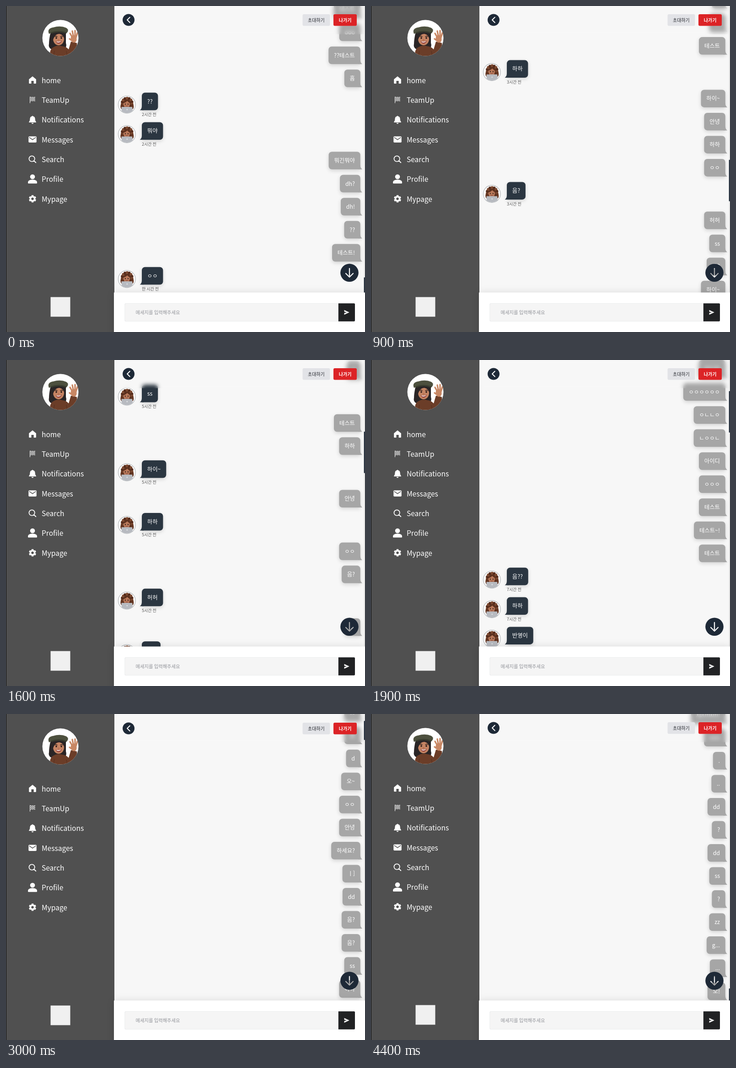
Recreate the animation shown at these times as an HTML page with a canvas. Size 785 px wide and 714 px high, loop 4500 ms.

```html
<!DOCTYPE html>
<html lang="ko">
<head>
<meta charset="utf-8">
<title>Chat</title>
<style>
  html, body { margin: 0; width: 785px; height: 714px; overflow: hidden; background: #f7f7f7; }
  canvas, #blur { position: absolute; left: 0; top: 0; }
  #blur { left: 237px; width: 546px; height: 62px; backdrop-filter: blur(4px); }
</style>
</head>
<body>
<canvas id="chat" width="785" height="714"></canvas>
<div id="blur"></div>
<canvas id="ui" width="785" height="714"></canvas>
<script>
const W = 785, H = 714, LOOP = 4500, STEP = 100;
const OWN_H = 50.5, OTHER_H = 64.8, BUBBLE_H = 38.5, PAD = 11.8, TOP_PAD = 30;
const FONT = '"Noto Sans CJK KR", "Noto Sans KR", "Noto Sans", sans-serif';
const chat = document.getElementById('chat').getContext('2d');
const ui = document.getElementById('ui').getContext('2d');

// ---- messages: a leading "<" marks the other person ----
const rows = [];
let nextY = TOP_PAD;

function add(words, age = '') {
  const start = rows.length;
  for (const word of words.split(' ')) {
    const other = word[0] === '<';
    rows.push({ text: other ? word.slice(1) : word, other, age, y: nextY });
    nextY += other ? OTHER_H : OWN_H;
  }
  return start;
}

function fill(count, others = 0, age = '') {
  const pool = ['ㅇㅇ', '테스트', 'dd', '??', '음?', '하하', 'ss', '안녕', '?', 'ㅎㅎ', '허허', '하이~'];
  const words = Array.from({ length: count }, (_, i) => {
    const other = Math.floor((i + 1) * others / count) > Math.floor(i * others / count);
    return (other ? '<' : '') + pool[(i * 7 + i * i % 5) % pool.length];
  });
  return add(words.join(' '), age);
}

fill(4);
add('ss 음 d 오~ ㅇㅇ 안녕 하세요? ㅣ] dd 음? 음? ss 하하');
fill(5);
add('안녕 하이~ 안 녕 하세요 음 허허 ?? ㅇㅇ 허허 ss ?? dd');
fill(93, 5, '8시간 전');
const recent = fill(10);
const ids = add('테스트 ㅇㅇㅇㅇㅇㅇ ㅇㄴㄴㅇ ㄴㅇㅇㄴ 아이디 ㅇㅇㅇ 테스트 테스트~! 테스트 <음?? <하하 <반영이', '7시간 전');
fill(13, 5, '5시간 전');
const dates = add('<그렇군 ?? ㅇㅇ ㅇㅇ <날짜 dd ㅇㅇ ????????? ?? ㅎㅎ <일 이', '4시간 전');
fill(15, 3, '3시간 전');
const tests = add('ㅇㅇ 테스트트ㅡㅡㅡ coxld! 테스트 ? ㄴ xptmxm! mm . .. dd ? dd ss ? zz g... ... 오!');
fill(6, 2, '2시간 전');
const latest = add('테스트 ooo ??테스트 흠 <?? <뭐야 뭐긴뭐야 dh? dh! ?? 테스트!', '2시간 전');
add('<ㅇㅇ', '한 시간 전');

// ---- scroll position over time ----
const scrollFor = (row, screenY) => rows[row].y - screenY;
const recentTop = scrollFor(recent, TOP_PAD);
const LOADED = 2600;
const keys = [
  [0, scrollFor(latest, -12.3)],
  [500, scrollFor(tests, 0)],
  [1300, scrollFor(dates, -15.3)],
  [1900, scrollFor(ids, 0.3)],
  [2200, recentTop],
  [2599, recentTop],
  [LOADED, 0],
  [3000, 255],
  [3300, 300],
  [3800, 300],
  [3900, 1141],
  [4400, scrollFor(tests, 0) + 321],
];

function scrollAt(t) {
  let i = 0;
  while (i < keys.length - 2 && t >= keys[i + 1][0]) i++;
  const [t0, a] = keys[i], [t1, b] = keys[i + 1];
  return a + (b - a) * Math.min(1, (t - t0) / (t1 - t0));
}

// ---- drawing helpers ----
function ellipse(c, x, y, rx, ry, color, turn = 0) {
  c.fillStyle = color;
  c.beginPath();
  c.ellipse(x, y, rx, ry, turn, 0, Math.PI * 2);
  c.fill();
}

function box(c, x, y, w, h, r, color) {
  c.fillStyle = color;
  c.beginPath();
  c.roundRect(x, y, w, h, r);
  c.fill();
}

function shape(c, d, color) {
  c.fillStyle = color;
  c.fill(new Path2D(d));
}

function line(c, d, color, width) {
  c.strokeStyle = color;
  c.lineWidth = width;
  c.lineCap = c.lineJoin = 'round';
  c.stroke(new Path2D(d));
}

function text(c, s, x, midY, size, color, weight = 400) {
  c.font = `${weight} ${size}px ${FONT}`;
  c.fillStyle = color;
  c.fillText(s, x, midY + size * 0.37);
}

function shadow(c, color, blur, dy) {
  c.shadowColor = color;
  c.shadowBlur = blur;
  c.shadowOffsetY = dy;
}

function clipCircle(c, x, y, r) {
  c.beginPath();
  c.arc(x, y, r, 0, Math.PI * 2);
  c.clip();
}

// ---- chat layer ----
function smallAvatar(c, x, y) {
  c.save();
  c.translate(x, y);
  ellipse(c, 0, 0, 19.5, 19.5, '#b4b8bb');
  ellipse(c, 0, 0, 18.3, 18.3, '#fcfcfc');
  clipCircle(c, 0, 0, 18.3);
  ellipse(c, 0.5, -4, 11.5, 12, '#6b3b26');
  for (let i = 0; i < 11; i++) {
    const a = Math.PI * (0.8 + i * 0.14);
    ellipse(c, 0.5 + Math.cos(a) * 11, -3 + Math.sin(a) * 11, 3, 3.2, i % 2 ? '#7d4a31' : '#552c1c');
  }
  ellipse(c, -11, 4, 3, 6, '#643622');
  ellipse(c, 12, 4, 3, 6, '#643622');
  ellipse(c, -0.5, -1, 7, 8, '#b8785a');
  shape(c, 'M-8-3Q-5-12 3-11Q8-9 8-3Q3-5 1-8Q-3-4-8-3Z', '#5b301e');
  ellipse(c, -3.4, -1, 1.1, 1.2, '#2a1c18');
  ellipse(c, 2.6, -1, 1.1, 1.2, '#2a1c18');
  line(c, 'M-2.5 3Q0 4.4 2.2 3', '#7c3e32', 1);
  shape(c, 'M-11 5H11Q12 5 12 6L13 19H-11L-12 6Q-12 5-11 5Z', '#b7bac0');
  ellipse(c, 0.5, 11, 1.4, 1.4, '#dfe1e4');
  c.restore();
}

function bubble(c, row, y) {
  c.font = `500 12.4px ${FONT}`;
  const w = c.measureText(row.text).width + PAD * 2;
  const x = row.other ? 297 : 774.8 - w;
  const base = y + BUBBLE_H;
  const edge = row.other ? x : x + w, out = row.other ? -4.4 : 4.4;
  c.save();
  shadow(c, 'rgba(0,0,0,.15)', 8, 3);
  box(c, x, y, w, BUBBLE_H, row.other ? [7, 7, 7, 0] : [7, 7, 0, 7], row.other ? '#2b3641' : '#a6a6a6');
  shadow(c, 'transparent', 0, 0);
  c.fill(new Path2D(`M${edge} ${base - 9}Q${edge} ${base - 3} ${edge + out} ${base}H${edge - out}V${base - 9}Z`));
  c.restore();
  text(c, row.text, x + PAD, y + BUBBLE_H / 2, 12.4, '#fff', 500);
  if (row.other) {
    smallAvatar(c, 264.3, y + 26.2);
    text(c, row.age, 297, y + 48, 9, '#555');
  }
}

function drawChat(scroll, firstRow) {
  chat.fillStyle = '#f7f7f7';
  chat.fillRect(0, 0, W, H);
  for (let i = firstRow; i < rows.length; i++) {
    const y = rows[i].y - scroll;
    if (y > -75 && y < 640) bubble(chat, rows[i], y);
  }
}

// ---- interface layer ----
function portrait(c) {
  c.save();
  c.translate(119, 70);
  ellipse(c, 0, 0, 39.5, 39.5, '#fff');
  clipCircle(c, 0, 0, 39.5);
  shape(c, 'M-22-10Q-25 4-25 13Q-27 20-21 24Q-8 28 8 24Q15 20 12 11L12-12Z', '#2a2526');
  shape(c, 'M-23 40Q-24 24-15 20Q-5 14 4 18Q13 19 18 25L23 8L36 11Q37 30 24 40Z', '#6b3d28');
  line(c, 'M-13 28Q-15 34-14 40M13 29Q15 34 14 40', '#532f1f', 1);
  ellipse(c, -4, 2, 12, 14, '#c58463');
  shape(c, 'M-21-9Q-16-16-3-15Q11-15 12-5L9 4Q7-7-2-9Q-12-9-16 4L-21 4Z', '#2a2526');
  shape(c, 'M-26-12Q-28-21-16-23Q0-28 13-22Q20-17 14-11Q-4-18-25-9Z', '#4d503e');
  line(c, 'M-20-11Q-4-17 12-11', '#393c2f', 3);
  line(c, 'M-12-3Q-10-5-7-3M0-3Q3-5 5-3', '#352420', 1.4);
  ellipse(c, -9, 0, 1.7, 2, '#2b1c18');
  ellipse(c, 2, 0, 1.7, 2, '#2b1c18');
  ellipse(c, -4, 4, 1.8, 1.2, '#b06c50');
  shape(c, 'M-10 7Q-4 8.5 3 6Q1 12-4 12.5Q-9 12-10 7Z', '#913c37');
  shape(c, 'M-9 7.5Q-4 9 2 7Q0 9.5-4 10Q-8 10-9 7.5Z', '#fff');
  ellipse(c, 29, 2, 6.5, 8.5, '#c88764', -0.2);
  line(c, 'M25-3L21-10M28-5L26-15M32-5L32-16M34-1L37-11M24 5L20 2', '#c88764', 3.4);
  c.restore();
}

function icons(c) {
  const white = '#fff', gray = '#505050';
  shape(c, 'M58 154L65.8 160.5V169Q65.8 170 64.8 170H60.6V164H55.4V170H51.2Q50.2 170 50.2 169V160.5Z', white);
  line(c, 'M52.5 199V212.3', white, 1);
  for (let r = 0; r < 5; r++) {
    for (let k = 0; k < 5; k++) {
      c.fillStyle = (r + k) % 2 ? 'rgba(255,255,255,.12)' : 'rgba(255,255,255,.92)';
      c.fillRect(53.6 + k * 2, 199 + r * 1.9, 2, 1.9);
    }
  }
  shape(c, 'M56.7 241.5Q58 239.5 59.3 241.5Q63.6 242.5 63.6 247.5Q63.6 252 65.8 254V255H50.2V254Q52.4 252 52.4 247.5Q52.4 242.5 56.7 241.5ZM55.8 256H60.2Q60 258.2 58 258.2Q56 258.2 55.8 256Z', white);
  box(c, 49.3, 285.5, 17.4, 13.5, 1.8, white);
  line(c, 'M51.2 288L58 292.8L64.8 288', gray, 1.5);
  line(c, 'M62.8 334.5A6.2 6.2 0 1 1 50.4 334.5A6.2 6.2 0 1 1 62.8 334.5M61.2 339L65.3 343', white, 1.8);
  ellipse(c, 58, 374, 5.3, 5.3, white);
  shape(c, 'M48 386.5Q48 380.5 58 380.3Q68 380.5 68 386.5V387.5Q68 388.8 66.5 388.8H49.5Q48 388.8 48 387.5Z', white);
  c.save();
  c.translate(58, 422.3);
  for (let i = 0; i < 6; i++) {
    box(c, -2.3, -8, 4.6, 5, 1, white);
    c.rotate(Math.PI / 3);
  }
  ellipse(c, 0, 0, 6.2, 6.2, white);
  ellipse(c, 0, 0, 2.7, 2.7, gray);
  c.restore();
}

function sidebar(c, dy) {
  c.fillStyle = '#505050';
  c.fillRect(0, 0, 237, H);
  c.fillStyle = '#111';
  c.fillRect(0, 0, 1, H);
  c.save();
  c.translate(0, dy);
  portrait(c);
  icons(c);
  ['home', 'TeamUp', 'Notifications', 'Messages', 'Search', 'Profile', 'Mypage']
    .forEach((label, i) => text(c, label, 78, 163 + i * 43.3, 15.5, '#fff', 500));
  box(c, 97.5, 637.5, 43, 43, 0, '#f0f0f0');
  c.restore();
}

function header(c, dy) {
  c.save();
  c.translate(0, dy);
  ellipse(c, 268, 30.5, 13, 13, '#1e2937');
  line(c, 'M270.8 24.8L265 30.5L270.8 36.2', '#fff', 2);
  box(c, 648.5, 18, 60, 25.5, 3, '#e2e3e7');
  text(c, '초대하기', 660, 30.8, 10, '#25282e', 500);
  box(c, 716, 18, 51, 25.5, 3, '#dc2326');
  text(c, '나가기', 727.8, 30.8, 10, '#fff', 700);
  c.restore();
}

function scrollbar(c, top, height) {
  c.fillStyle = '#dedede';
  c.fillRect(783, 0, 2, 628);
  box(c, 782.7, top, 2.3, height, 1, '#1e2937');
}

// The arrow is a hole, so messages show through it.
function downButton(c) {
  ellipse(c, 751, 584.2, 19.8, 19.8, '#1e2937');
  c.save();
  c.globalCompositeOperation = 'destination-out';
  line(c, 'M751 575V593.5M743 585.8L751 593.8L759 585.8', '#000', 2.3);
  c.restore();
}

function inputBar(c) {
  c.save();
  shadow(c, 'rgba(0,0,0,.13)', 16, 0);
  c.fillStyle = '#fff';
  c.fillRect(236, 627.5, W - 236, H);
  c.restore();
  box(c, 259.5, 651.3, 468, 39.4, 2, '#e6e7e9');
  box(c, 260.3, 652.1, 467, 37.8, 2, '#f5f5f5');
  text(c, '메세지를 입력해주세요', 283.5, 671, 10.3, '#92949a');
  box(c, 726.8, 651.3, 36.2, 39.4, [0, 2, 2, 0], '#212224');
  shape(c, 'M739.5 665.7L750.8 671L739.5 676.3L739.8 672.2L745.5 671L739.8 669.8Z', '#fff');
}

function drawUi(scroll, loaded, dy) {
  ui.clearRect(0, 0, W, H);
  sidebar(ui, dy);
  header(ui, dy);
  if (loaded) scrollbar(ui, scroll / 17, 42);
  else scrollbar(ui, (scroll - recentTop) / 7.85, 91);
  downButton(ui);
  inputBar(ui);
}

// ---- loop ----
const startTime = performance.now();
let shown = -1;

function frame() {
  const elapsed = Math.max(0, performance.now() - startTime) % LOOP;
  const t = Math.floor(elapsed / STEP) * STEP;
  if (t !== shown) {
    shown = t;
    const loaded = t >= LOADED;
    const scroll = scrollAt(t);
    drawChat(scroll, loaded ? 0 : recent);
    drawUi(scroll, loaded, loaded && t < 3100 ? 1 : 0);
  }
  requestAnimationFrame(frame);
}
frame();
</script>
</body>
</html>
```
